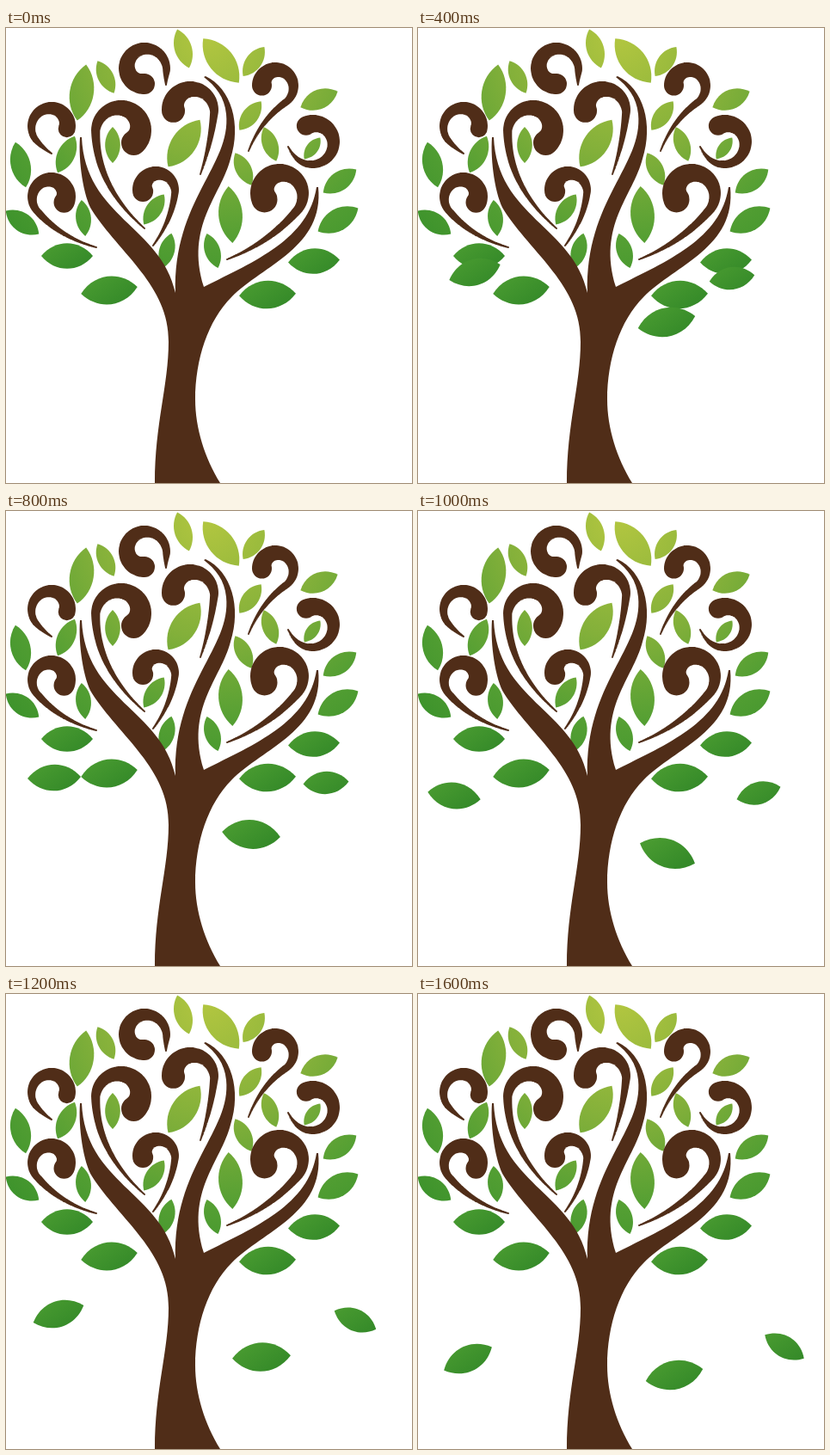
Recreate the animation shown at these times as an HTML page with a canvas. Size 472x529 px, loop 1.7 s.

```html
<!DOCTYPE html>
<html lang="en">
<head>
<meta charset="utf-8">
<title>Tree with falling leaves</title>
<style>
html, body { margin: 0; width: 100%; height: 100%; overflow: hidden; background: #fff; }
canvas { display: block; }
</style>
</head>
<body>
<canvas id="stage" width="472" height="529"></canvas>
<script>
const stage = document.getElementById('stage');
const ctx = stage.getContext('2d');
const BROWN = '#502d18';
const LOOP = 1700;

const mix = (a, b, t) => a + (b - a) * t;
const radians = degrees => degrees * Math.PI / 180;

// Lens around a centre; flatter-lying leaves are a little plumper
function leaf(g, x, y, degrees, length, fill) {
  const angle = radians(degrees), half = length / 2;
  const bulge = length * (0.28 + 0.05 * Math.cos(angle) ** 2);
  g.save();
  g.translate(x, y);
  g.rotate(angle);
  g.beginPath();
  g.moveTo(-half, 0);
  g.bezierCurveTo(-half * 0.46, -bulge, half * 0.46, -bulge, half, 0);
  g.bezierCurveTo(half * 0.46, bulge, -half * 0.46, bulge, -half, 0);
  g.restore();
  g.fillStyle = fill;
  g.fill();
}

// Hook whose outer edge follows a circle, thinning from a ball into a tail
function curl(g, cx, cy, radius, ball, start, sweep, tipX, tipY) {
  const neck = ball * 0.36, steps = 150;
  const dot = (x, y, width) => {
    g.moveTo(x + width / 2, y);
    g.arc(x, y, width / 2, 0, Math.PI * 2);
  };
  let x, y, angle;
  g.beginPath();
  for (let i = 0; i <= steps; i++) {
    const width = mix(ball, neck, i / steps);
    angle = radians(start + sweep * i / steps);
    x = cx + (radius - width / 2) * Math.cos(angle);
    y = cy + (radius - width / 2) * Math.sin(angle);
    dot(x, y, width);
  }
  const reach = Math.hypot(tipX - x, tipY - y) / 2 * Math.sign(sweep);
  const bendX = x - reach * Math.sin(angle), bendY = y + reach * Math.cos(angle);
  for (let i = 0; i <= steps; i++) {
    const t = i / steps;
    const along = (a, b, c) => mix(mix(a, b, t), mix(b, c, t), t);
    dot(along(x, bendX, tipX), along(y, bendY, tipY), mix(neck, 2, t));
  }
  g.fillStyle = BROWN;
  g.fill();
}

// Leaf length, then centre and tilt of each leaf of that size
const leavesBySize = {
  66: [[250, 38, 51], [88, 75, 99], [207, 134, 124], [261, 217, 86], [120, 305, -7], [304, 310, -2]],
  60: [[71, 265, 0], [358, 271, -3]],
  54: [[17, 159, 77], [386, 223, -30]],
  47: [[206, 24, 73], [364, 83, -23], [70, 147, 115], [388, 178, -35], [19, 226, 35]],
  42: [[288, 39, 126], [116, 57, 63], [284, 102, 127], [307, 135, 70], [124, 136, 90],
    [276, 164, 63], [172, 211, 124], [90, 221, 84], [187, 259, 105], [240, 259, 72]],
  31: [[356, 140, 127]]
};

const trunk = new Path2D(`M173 529 C173 460 189 415 189 365
  C190 300 132 262 100 212 C90 196 84 155 86 127 L88 127
  C92 220 180 230 197 308 C194 200 262 160 256 100 C254 80 244 68 230 57 L232 56
  C262 70 274 112 261 152 C250 195 208 230 230 301
  C290 271 352 245 361 185 L363 185
  C370 255 300 275 262 313 C235 340 220 385 220 432 C220 465 231 500 249 529 Z`);

function drawTree(g) {
  const glow = g.createRadialGradient(235, 10, 0, 235, 10, 340);
  glow.addColorStop(0, '#b2c640');
  glow.addColorStop(0.4, '#83b03a');
  glow.addColorStop(0.7, '#549f33');
  glow.addColorStop(1, '#38902a');
  for (const [length, group] of Object.entries(leavesBySize)) {
    for (const [x, y, tilt] of group) {
      leaf(g, x, y, tilt, +length, y > 260 ? shade(g, x, y) : glow);
    }
  }
  g.fillStyle = BROWN;
  g.fill(trunk);

  curl(g, 161, 47, 30, 24, 90, 275, 186, 66);
  curl(g, 53, 114, 28, 20, 10, -230, 53, 146);
  curl(g, 134, 119, 35, 29, 45, -225, 161, 233);
  curl(g, 53, 196, 28, 24, 25, -245, 105, 255);
  curl(g, 174, 188, 27, 24, 172, 195, 171, 253);
  curl(g, 214, 95, 33, 27, 176, 190, 226, 170);
  curl(g, 313, 67, 27, 23, 180, 235, 282, 143);
  curl(g, 357, 132, 31, 22, 246, 220, 328, 138);
  curl(g, 318, 192, 34, 30, 157, 243, 257, 269);
}

function shade(g, x, y) {
  const fill = g.createLinearGradient(x - 12, y - 18, x + 12, y + 18);
  fill.addColorStop(0, '#489a30');
  fill.addColorStop(1, '#358a29');
  return fill;
}

// Each leaf drifts through [x, y, tilt] poses reached at these steps
const poseSteps = [0, 3, 7, 9, 11, 13, 15];
const falling = [
  { length: 62, poses: [[71, 265, 0], [66, 284, -17], [56, 310, -2], [42, 331, 8], [61, 372, -19], [67, 405, -32], [58, 424, -26]] },
  { length: 53, poses: [[358, 271, -3], [365, 291, -8], [372, 316, -3], [396, 328, -16], [406, 379, 24], [415, 408, 42], [426, 410, 31]] },
  { length: 68, poses: [[304, 310, -2], [289, 342, -12], [285, 376, 5], [290, 398, 20], [297, 422, -3], [297, 440, -19], [298, 443, -12]] }
];

function drawFalling({ length, poses }, step) {
  const next = poseSteps.findIndex(s => s >= step);
  const from = poseSteps[next - 1];
  const t = (step - from) / (poseSteps[next] - from);
  const [x, y, tilt] = poses[next].map((v, i) => mix(poses[next - 1][i], v, t));
  leaf(ctx, x, y, tilt, length, shade(ctx, x, y));
}

const tree = document.createElement('canvas');
tree.width = stage.width;
tree.height = stage.height;
drawTree(tree.getContext('2d'));

function frame() {
  // The resting tree holds for two ticks of 100 ms
  const step = Math.floor((performance.now() % LOOP) / 100) - 1;
  ctx.fillStyle = '#fff';
  ctx.fillRect(0, 0, stage.width, stage.height);
  ctx.drawImage(tree, 0, 0);
  if (step > 0) falling.forEach(f => drawFalling(f, step));
  requestAnimationFrame(frame);
}
frame();
</script>
</body>
</html>
```
